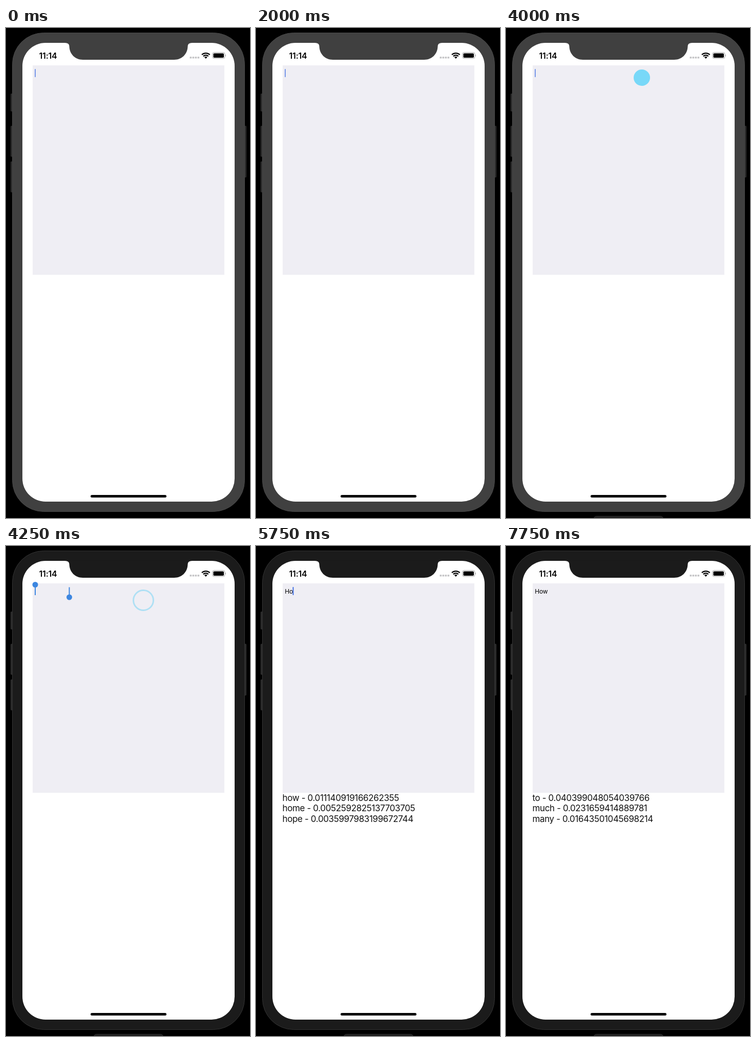
Animation of 476 by 957 pixels, one loop 8000 ms. Source, as an HTML page:

```html
<!DOCTYPE html>
<html lang="en">
<head>
<meta charset="utf-8">
<title>Word prediction</title>
<style>
  html, body { margin: 0; width: 100%; height: 100%; overflow: hidden; background: #000; }
  svg { display: block; width: 476px; height: 957px; }
  text { font-family: Inter, Roboto, sans-serif; white-space: pre; }
  .body { fill: #404040; stroke: #484848; }
  .buttons { fill: #2a2a2a; stroke: #363636; stroke-width: .7; }
  .active .body { fill: #1b1b1b; stroke: #333; }
  .active .notch { fill: #1b1b1b; }
  .notch { fill: #404040; }
  .prediction { font-size: 17px; letter-spacing: -.37px; fill: #111; }
  .typed { font-size: 12px; letter-spacing: -.2px; }
  .clock { font-size: 16px; font-weight: 600; letter-spacing: -.2px; }
</style>
</head>
<body>
<svg id="stage" viewBox="0 0 476 957">
  <rect width="476" height="957"/>
  <rect id="tab" x="171.5" y="953.5" width="135" height="12" rx="5" fill="#1d1d1d" stroke="#303030"/>
  <g class="buttons">
    <rect x="9.4" y="128.5" width="6" height="34" rx="1"/>
    <rect x="9.4" y="191.5" width="6" height="59.5" rx="1"/>
    <rect x="9.4" y="261" width="6" height="59.5" rx="1"/>
    <rect x="462.6" y="191.5" width="6" height="100" rx="1"/>
  </g>
  <rect class="body" x="12.5" y="9.5" width="453" height="935" rx="61"/>
  <rect x="32" y="29" width="414" height="896" rx="45" fill="#fff"/>
  <path class="notch" d="M115 28.5V29Q123.500 29 123.500 36C124 51 135 62 150 62H328C343 62 354 51 354.500 36Q354.500 29 363 29V28.500Z"/>
  <text class="clock" x="64.5" y="59.5">11:14</text>
  <g fill="#c5c5c7">
    <rect x="358.500" y="56" width="3.700" height="3.600" rx=".7"/>
    <rect x="363.500" y="56" width="3.700" height="3.600" rx=".7"/>
    <rect x="368.500" y="56" width="3.700" height="3.600" rx=".7"/>
    <rect x="373.500" y="56" width="3.700" height="3.600" rx=".7"/>
  </g>
  <g fill="none" stroke="#000" stroke-width="2.300">
    <path d="M382 52.200A11.200 11.200 0 0 1 397.600 52.200"/>
    <path d="M384.900 55.100A7.100 7.100 0 0 1 394.700 55.100"/>
  </g>
  <path d="M386.900 57.100A4.300 4.300 0 0 1 392.700 57.100L389.800 60Z"/>
  <rect x="402.800" y="47.800" width="24.200" height="11.800" rx="3.300" fill="none" stroke="#a5a5a5"/>
  <rect x="404.500" y="49.500" width="20.500" height="8.500" rx="1.800"/>
  <path d="M428 51.800Q430.200 53.700 428 55.700Z" fill="#a5a5a5"/>
  <rect x="52" y="73" width="374" height="409" fill="#efeef4"/>
  <text class="typed" id="typed" x="56.300" y="92.500"></text>
  <rect id="caret" y="80" width="2" height="16" rx=".8" fill="#4471e2"/>
  <g id="handles" fill="#3c86e0">
    <rect x="56" y="76" width="2" height="20"/>
    <circle cx="57" cy="75.500" r="5.500"/>
    <rect x="122.500" y="80.500" width="2" height="20"/>
    <circle cx="123.500" cy="100" r="5.500"/>
  </g>
  <circle id="touch" stroke-width="3"/>
  <g id="predictions"></g>
  <rect x="165" y="912" width="148" height="5" rx="2.500"/>
</svg>
<script>
const $ = id => document.getElementById(id);
const STEP = 250, LOOP = 8000;
const BLINK = [.7, 1, .5, 0];

const lines = [0, 1, 2].map(i => {
  const line = document.createElementNS('http://www.w3.org/2000/svg', 'text');
  line.setAttribute('class', 'prediction');
  line.setAttribute('x', 51.5);
  line.setAttribute('y', 498 + i * 20.4);
  return $('predictions').appendChild(line);
});

const WORDS = {
  h: ['have - 0.012836104513064132', 'he - 0.0094726105316508342', 'had - 0.0071530216490382511'],
  ho: ['how - 0.011140919166262355', 'home - 0.0052592825137703705', 'hope - 0.0035997983199672744'],
  how: ['how - 0.017189533529693816', 'however - 0.002467390134353625', 'howler - 0.00034307633595256036'],
  next: ['to - 0.040399048054039766', 'much - 0.0231659414889781', 'many - 0.01643501045698214']
};

// Start time, typed text, caret x, caret opacity (null blinks), predictions
const TYPING = [
  [0, '', 56, null, []],
  [4250, '', 56, 0, []],
  [4500, '', 56, 1, []],
  [5000, '', 56, 0, []],
  [5500, 'H', 65, 1, WORDS.h],
  [5750, 'Ho', 71.5, 1, WORDS.ho],
  [6250, 'How', 80.5, 1, WORDS.how],
  [7000, 'How ', 83.5, 1, WORDS.how],
  [7250, 'How ', 83.5, 1, WORDS.next],
  [7500, 'How ', 83.5, .5, WORDS.next],
  [7750, 'How ', 83.5, 0, WORDS.next]
];

// Start time, x, y, radius, fill, stroke
const TOUCHES = [
  [0, 0, 0, 0, 'none', 'none'],
  [3750, 319, 74, 16, '#78d8f8', 'none'],
  [4000, 265, 97, 16, '#78d8f8', 'none'],
  [4250, 268, 106, 19.5, 'none', '#afe0f4'],
  [4500, 0, 0, 0, 'none', 'none']
];

const current = (table, time) => table.findLast(row => row[0] <= time);
const show = (id, visible) => $(id).setAttribute('visibility', visible ? 'visible' : 'hidden');

function draw(time) {
  const [, text, x, opacity, words] = current(TYPING, time);
  $('typed').textContent = text;
  $('caret').setAttribute('x', x);
  $('caret').setAttribute('opacity', opacity ?? BLINK[time / STEP % BLINK.length]);
  lines.forEach((line, i) => line.textContent = words[i] ?? '');

  const touch = current(TOUCHES, time);
  ['cx', 'cy', 'r', 'fill', 'stroke'].forEach((name, i) => $('touch').setAttribute(name, touch[i + 1]));

  show('handles', time === 4250);
  show('tab', time >= 3500);
  $('stage').classList.toggle('active', time >= 4250);
}

const start = performance.now();
let shown = -1;
function tick() {
  const time = Math.floor((performance.now() - start) % LOOP / STEP) * STEP;
  if (time !== shown) draw(shown = time);
  requestAnimationFrame(tick);
}
tick();
</script>
</body>
</html>
```
